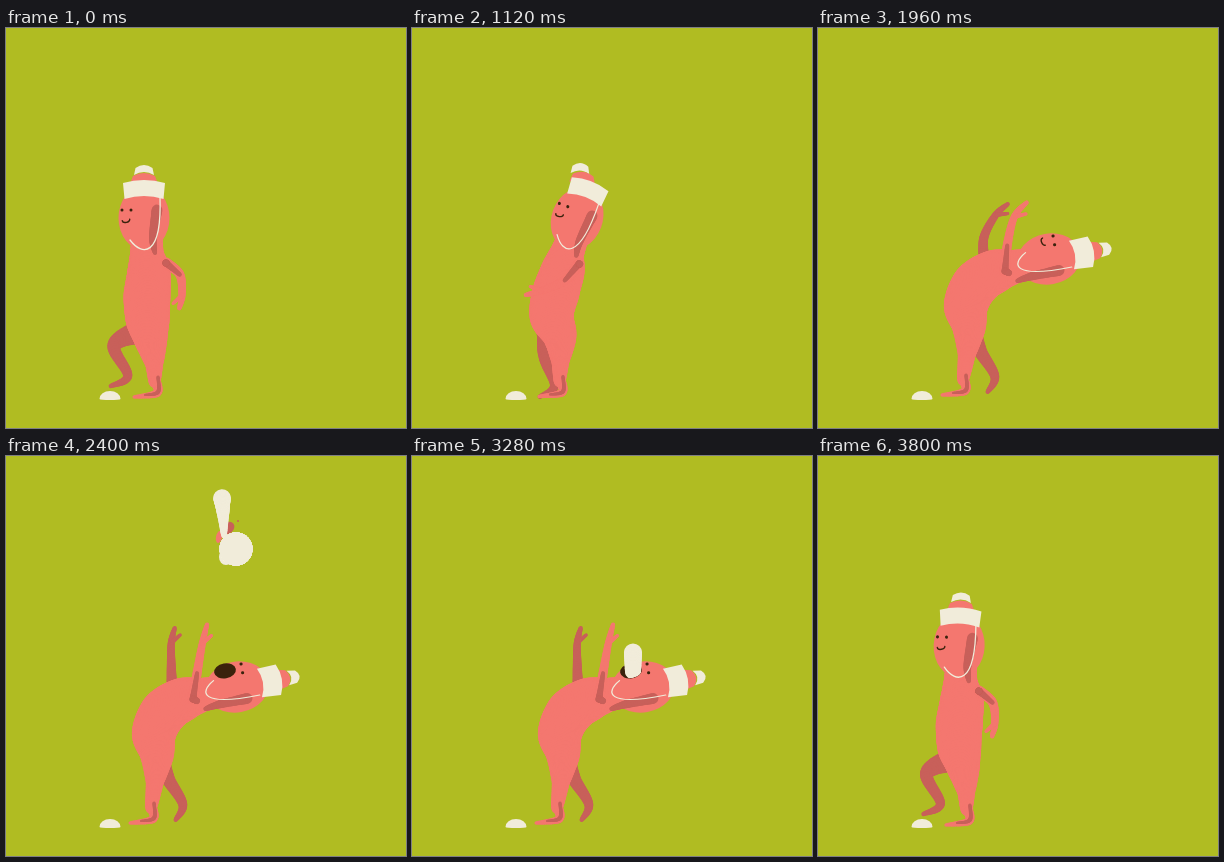
Write an HTML page with a canvas that moves like this. It is 400x400 px and loops after 3840 ms.

```html
<!DOCTYPE html>
<html lang="en">
<head>
<meta charset="utf-8">
<title>Catch</title>
<style>
html, body { margin: 0; width: 100%; height: 100%; overflow: hidden; background: #b0bc22; }
canvas { display: block; width: 400px; height: 400px; }
</style>
</head>
<body>
<canvas id="stage" width="400" height="400"></canvas>
<script>
const ctx = document.getElementById('stage').getContext('2d');
const LOOP = 3840, PIVOT = [145, 290], RAD = Math.PI / 180;
const BG = '#b0bc22', PINK = '#f4776f', DARK = '#c8605a', CREAM = '#f1ecda', INK = '#3a220c';

const lerp = (a, b, k) => a + (b - a) * k;
const ease = k => (1 - Math.cos(Math.PI * Math.min(1, Math.max(0, k)))) / 2;

// 0 upright, 1 bent over backwards
const bend = (t, lag = 0) => ease((t - lag - 910) / 620) - ease((t - 3330) / 530);

// Swings a point around the hip from its upright to its bent place.
function swing([x0, y0], [x1, y1], k) {
  const polar = (x, y) => [Math.hypot(x - PIVOT[0], y - PIVOT[1]), Math.atan2(y - PIVOT[1], x - PIVOT[0])];
  const [r0, a0] = polar(x0, y0), [r1, a1] = polar(x1, y1);
  const turn = Math.atan2(Math.sin(a1 - a0), Math.cos(a1 - a0));
  const r = lerp(r0, r1, k), a = a0 + turn * k;
  return [PIVOT[0] + r * Math.cos(a), PIVOT[1] + r * Math.sin(a)];
}

// Curved stroke whose width changes from joint to joint.
function limb(points, widths, color) {
  const steps = 14;
  ctx.strokeStyle = color;
  let prev = points[0];
  for (let i = 0; i < points.length - 1; i++) {
    const a = points[i], b = points[i + 1], p = points[i - 1] || a, q = points[i + 2] || b;
    for (let s = 1; s <= steps; s++) {
      const u = s / steps;
      const next = [0, 1].map(c => a[c] + u / 2 * (b[c] - p[c] +
        u * (2 * p[c] - 5 * a[c] + 4 * b[c] - q[c] + u * (3 * a[c] - p[c] - 3 * b[c] + q[c]))));
      ctx.lineWidth = lerp(widths[i], widths[i + 1], u);
      ctx.beginPath();
      ctx.moveTo(...prev);
      ctx.lineTo(...next);
      ctx.stroke();
      prev = next;
    }
  }
}

function oval(x, y, rx, ry, color, turn = 0) {
  ctx.beginPath();
  ctx.ellipse(x, y, rx, ry, turn, 0, 7);
  ctx.fillStyle = color;
  ctx.fill();
}

// Each pose holds three joint angles in degrees and a stretch.
const HANG = [40, 84, 102, .95], HIDE = [90, 92, 90, .9];
const THROW = [245, 247, 244, 1.42], REACH = [168, 180, 192, 1.1];
const WAVE = [275, 284, 311, 1.35], FAR_WAVE = [270, 298, 318, 1.15], UP = [279, 280, 284, 1.38], FAR_UP = [268, 270, 283, 1.08];
const TIPTOE = [149, 65, 149, 1], STAMP = [145, 88, 180, 1.02], BACK = [62, 60, 115, .85];

const nearArm = [[880, HANG], [1400, THROW], [1840, WAVE], [2000, WAVE], [2280, UP], [3320, UP], [3780, HANG]];
const farArm = [[1000, HIDE], [1400, REACH], [1840, FAR_WAVE], [2000, FAR_WAVE], [2280, FAR_UP], [3320, FAR_UP], [3740, HIDE]];
const farLeg = [[200, TIPTOE], [560, STAMP], [860, STAMP], [1340, BACK], [3300, BACK], [3540, STAMP], [3740, TIPTOE]];

function poseAt(t, keys) {
  const i = keys.findIndex(([time]) => time > t);
  if (i < 1) return keys[0][1];
  const [[t0, a], [t1, b]] = keys.slice(i - 1);
  return a.map((v, j) => lerp(v, b[j], ease((t - t0) / (t1 - t0))));
}

function chain(root, [a, b, c, stretch], lengths) {
  const joints = [root];
  [a, b, c].forEach((angle, i) => joints.push(step(joints[i], angle, lengths[i] * stretch)));
  return joints;
}

const step = ([x, y], angle, len) => [x + len * Math.cos(angle * RAD), y + len * Math.sin(angle * RAD)];

function arm(shoulder, pose, color) {
  const joints = chain(shoulder, pose, [19, 22, 14]);
  limb(joints, [11, 9, 7, 4], color);
  limb([joints[2], step(joints[2], pose[2] + 36, 12)], [5, 3], color);
  return joints;
}

// Upright place, bent place and width, from ankle to neck.
const spine = [
  [[148.5, 354], [145, 352], 11], [[148, 334], [149, 324], 18], [[144.5, 310], [151, 298], 33],
  [[141.5, 290], [148, 277], 44], [[141, 268], [158, 256], 47], [[143, 246], [176, 244], 44],
  [[141, 228], [195, 239], 34], [[141, 208], [215, 236], 30]];

function drawBody(k) {
  limb(spine.map(([a, b]) => swing(a, b, k)), spine.map(row => row[2]), PINK);
  ctx.save();
  ctx.translate(-4 * k, -2 * k);
  limb([[149, 352], [151, 365], [128, 369]], [11, 8, 3], PINK);
  limb([[152, 349], [152, 364], [139, 367]], [3, 4, 2], DARK);
  ctx.restore();
}

// Hat part with arched edges, centred on the head's axis.
function band(top, bottom, topHalf, lowHalf, color) {
  ctx.beginPath();
  ctx.moveTo(-topHalf, top);
  ctx.quadraticCurveTo(0, top - 6, topHalf, top);
  ctx.lineTo(lowHalf, bottom);
  ctx.quadraticCurveTo(0, bottom - 6, -lowHalf, bottom);
  ctx.fillStyle = color;
  ctx.fill();
}

function drawHead(t, k) {
  const turned = (angle, sx, sy, paint) => {
    ctx.save();
    ctx.rotate(angle * 80 * RAD);
    ctx.scale(sx, sy);
    paint();
    ctx.restore();
  };
  const open = ease((t - 2060) / 200) - ease((t - 3310) / 110);
  const squash = lerp(1, .74, k), stretch = lerp(1, 1.2, k);

  ctx.save();
  ctx.translate(...swing([138, 190], [231, 231], k));
  turned(k, 1, 1, () => {
    oval(0, 0, 25.5, 32, PINK);
    limb([[13, -8], [9 + 5 * k, 20], [11 + 5 * k, 35]], [11, 8, 4], DARK);
    oval(-22, -8, 1.5, 1.6, INK);
    oval(-13, -8, 1.5, 1.6, INK);
    if (open > .1) oval(-18, lerp(2, 9, open), 7.5 * open, 11 * open, INK);
    else {
      ctx.beginPath();
      ctx.ellipse(-18, 2, 3.8, 2.4, -.2, 0, Math.PI);
      ctx.strokeStyle = INK;
      ctx.lineWidth = 1.4;
      ctx.stroke();
    }
  });
  turned(k, squash, 1, () => {
    ctx.beginPath();
    ctx.moveTo(16, -21);
    ctx.bezierCurveTo(18, 40, -2, 38, -14, 22);
    ctx.strokeStyle = CREAM;
    ctx.lineWidth = 1.3;
    ctx.stroke();
  });
  turned(bend(t, 127), squash, stretch, () => band(-50, -43, 8.5, 10, CREAM));
  turned(bend(t, 84), squash, stretch, () => band(-42, -34, 11, 14, PINK));
  turned(k, squash, stretch, () => band(-35, -19, 21, 19.5, CREAM));
  ctx.restore();
}

function button(t) {
  const press = ease((t - 500) / 80) - ease((t - 760) / 120);
  const rx = lerp(10.5, 12, press), y = lerp(371, 369, press);
  ctx.beginPath();
  ctx.ellipse(104, y, rx, lerp(8, 3.5, press), 0, Math.PI, 0);
  ctx.ellipse(104, y, rx, lerp(1, 3, press), 0, 0, Math.PI);
  ctx.fillStyle = CREAM;
  ctx.fill();
}

// A cloud pops up, melts into one lump and drops into the mouth.
function treat(t) {
  if (t < 2220 || t > 3340) return;
  const grow = ease((t - 2220) / 160), loose = 1 - ease((t - 2500) / 420);
  const fall = 117 * (Math.max(0, t - 3000) / 280) ** 2;
  ctx.save();
  ctx.beginPath();
  ctx.rect(0, 0, 400, 217);
  ctx.ellipse(219, 215, 11, 7, -.2, 0, 7);
  ctx.clip();
  ctx.translate(221, 88 + fall);
  ctx.scale(grow, grow);
  ctx.save();
  ctx.scale(loose, loose);
  oval(1, -16, 7, 5.5, DARK, -.7);
  oval(-8, -7, 3, 6, PINK, .2);
  oval(11, -23, 1, 1, DARK);
  limb([[-5, -46], [-4, -32], [-3, -8]], [18, 13, 5], CREAM);
  oval(-1, 13, 7, 8, CREAM);
  ctx.restore();
  const x = 9 * loose, y = 5 * loose, half = 9.5 * (1 - loose);
  limb([[x, y - half], [x, y + half + .1]], [lerp(18, 33, loose), lerp(16, 33, loose)], CREAM);
  ctx.restore();
}

function draw(t) {
  const k = bend(t);
  ctx.fillStyle = BG;
  ctx.fillRect(0, 0, 400, 400);
  ctx.lineCap = ctx.lineJoin = 'round';

  button(t);
  arm(swing([143, 238], [166, 231], k), poseAt(t, farArm), DARK);
  const hip = [lerp(131, 152, k), 304];
  limb(chain(hip, poseAt(t, farLeg), [27, 33, 20]), [24, 13, 9, 4], DARK);
  drawBody(k);
  drawHead(t, k);
  const [shoulder, elbow] = arm(swing([160, 235], [187, 243], k), poseAt(t, nearArm), PINK);
  limb([shoulder, elbow], [7, 4], DARK);
  limb([shoulder, [shoulder[0] + 4 * k, shoulder[1] + 2 * k]], [7, 6], DARK);
  treat(t);
}

function frame() {
  draw(performance.now() % LOOP);
  requestAnimationFrame(frame);
}
frame();
</script>
</body>
</html>
```
